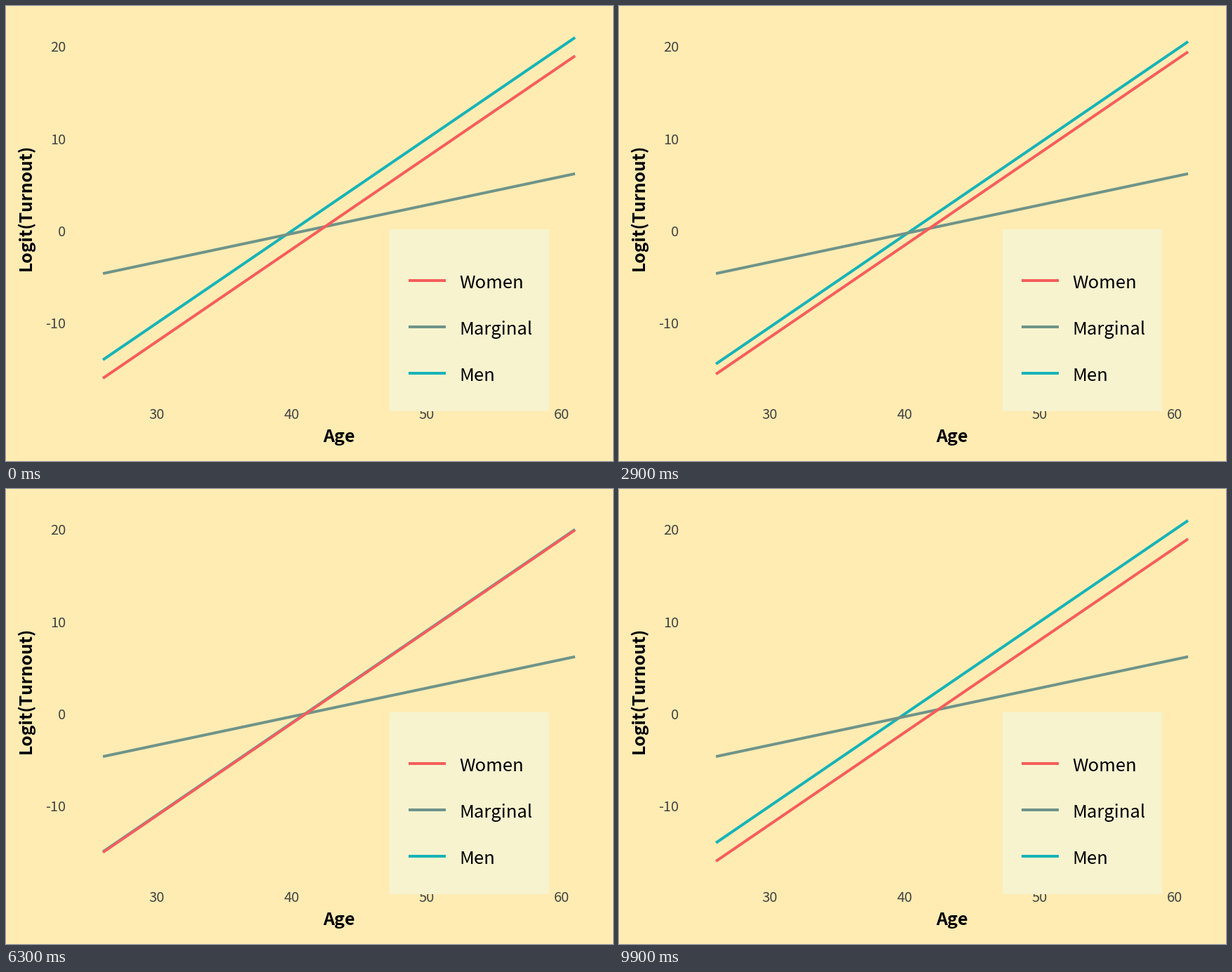
Write a matplotlib script that moves like this. It is 864x648 px and loops after 10 s.

```python
import numpy as np
import matplotlib.pyplot as plt
from matplotlib.animation import FuncAnimation
from matplotlib.patches import Rectangle

W, H = 864, 648
FRAMES, STEP = 100, 100
RED, GREY, TEAL = "#F65D5B", "#6F9489", "#17B3B7"

plt.rcParams["font.family"] = "Noto Sans CJK JP"

fig = plt.figure(figsize=(W / 72, H / 72), dpi=72, facecolor="#FFECB3")
ax = fig.add_axes([0, 0, 1, 1])
ax.set_xlim(0, W)
ax.set_ylim(H, 0)
ax.axis("off")

AGES = np.array([26, 61])


def px(age):
    return 138 + 19.2 * (age - 26)


def py(logit):
    return 320.3 - 13.115 * logit


def stroke(x, y, color, z):
    return ax.plot(x, y, color=color, lw=4, solid_capstyle="butt", zorder=z)[0]


def label(x, y, text, size, color="black", **kw):
    ax.text(x, y, text, fontsize=size, color=color, va="baseline",
            rotation_mode="anchor", **kw)


# Axes
for v in (20, 10, 0, -10):
    label(85, py(v) + 7.4, str(v), 20, "#444444", ha="right", zorder=1)
for v in (30, 40, 50, 60):
    label(px(v), 588.3, str(v), 20, "#444444", ha="center", zorder=1)
label(473.5, 621, "Age", 25, ha="center", weight="bold")
label(36, 287, "Logit(Turnout)", 24.7, ha="center", weight="bold",
      rotation=90)

# Data lines
men = stroke(px(AGES), py(AGES - 40), TEAL, 3)
stroke(px(AGES), py(np.array([-4.63, 6.21])), GREY, 4)
women = stroke(px(AGES), py(AGES - 42), RED, 5)

# Legend
ax.add_patch(Rectangle((545.5, 318), 227, 259, fc="#F7F3CF", ec="none",
                       zorder=6))
for i, (name, color) in enumerate(
        [("Women", RED), ("Marginal", GREY), ("Men", TEAL)]):
    y = 391 + 66 * i
    stroke([573, 626], [y, y], color, 7)
    label(645, y + 11, name, 25.6, zorder=7)


def update(i):
    gap = np.interp(i, [12, 50, 62, 99], [1, 0, 0, 1])
    men.set_ydata(py(AGES - 41 + gap))
    women.set_ydata(py(AGES - 41 - gap))
    return men, women


anim = FuncAnimation(fig, update, frames=FRAMES, interval=STEP,
                     repeat=True, repeat_delay=0)
plt.show()
```
